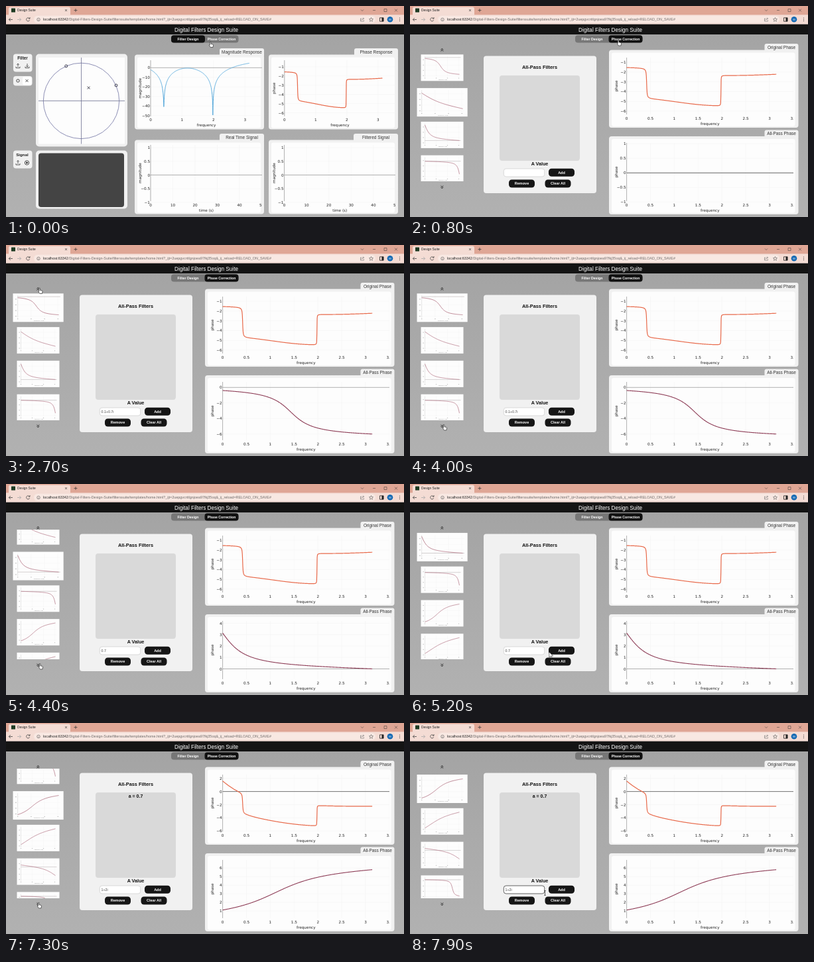
Animation of 600 by 319 pixels, one loop 8 s. Source, as an HTML page:

```html
<!DOCTYPE html>
<html lang="en">
<head>
<meta charset="utf-8">
<title>Design Suite</title>
<style>
  html, body { margin: 0; width: 100%; height: 100%; overflow: hidden; background: #a6a6a6; }
  body > svg { display: block; width: 100vw; height: 100vh; font-family: "Liberation Sans", Arial, sans-serif; }
  .plot { font-family: "DejaVu Sans", Verdana, sans-serif; }
  text { white-space: pre; }
</style>
</head>
<body>
<svg id="stage" viewBox="0 0 600 319"></svg>
<script>
const { sin, cos, atan2, sqrt, PI } = Math;
const LOOP = 8000;
const INK = '#161616', CARD = '#f1f1f1', BAR = '#f4dcd4';

// ---------- drawing helpers ----------
const rect = (x, y, w, h, fill, r = 0, extra = '') =>
  `<rect x="${x}" y="${y}" width="${w}" height="${h}" rx="${r}" fill="${fill}" ${extra}/>`;
const line = (x1, y1, x2, y2, stroke, w = 0.6) =>
  `<path d="M${x1} ${y1}L${x2} ${y2}" stroke="${stroke}" stroke-width="${w}"/>`;
const stroke = (d, color = '#333', w = 0.8, extra = '') =>
  `<path d="${d}" fill="none" stroke="${color}" stroke-width="${w}" ${extra}/>`;
const circle = (x, y, r, fill, extra = '') =>
  `<circle cx="${x}" cy="${y}" r="${r}" fill="${fill}" ${extra}/>`;
const ring = (x, y, r, color = '#222', w = 0.8) => circle(x, y, r, 'none', `stroke="${color}" stroke-width="${w}"`);
const text = (s, x, y, size, { fill = '#222', anchor = 'middle', bold = false, extra = '' } = {}) =>
  `<text x="${x}" y="${(y + size * 0.36).toFixed(2)}" font-size="${size}" fill="${fill}" text-anchor="${anchor}"` +
  `${bold ? ' font-weight="700"' : ''} ${extra}>${s}</text>`;
const group = (id, body) => `<g id="${id}">${body}</g>`;
const clip = (x, y, w, h, body, cls = '') =>
  `<svg class="${cls}" x="${x}" y="${y}" width="${w}" height="${h}" viewBox="${x} ${y} ${w} ${h}">${body}</svg>`;
const span = (from, to, step) =>
  Array.from({ length: Math.round((to - from) / step) + 1 }, (_, i) => +(from + i * step).toFixed(2));

function curve(f, px, py, color, width, n = 600) {
  const pts = span(0, n, 1).map(i => {
    const w = i / n * PI;
    return px(w).toFixed(2) + ' ' + py(f(w)).toFixed(2);
  });
  return stroke('M' + pts.join('L'), color, width, 'stroke-linejoin="round"');
}

// ---------- signal maths ----------
const bend = (r, th, w) => atan2(r * sin(w - th), 1 - r * cos(w - th));
const dist = (r, th, w) => sqrt(1 + r * r - 2 * r * cos(w - th));
const magnitude = w => 20 * Math.log10(dist(0.9954, 0.42, w) * dist(0.9982, 1.98, w) / dist(0.398, 1.074, w));
const phase = w => 0.42 - PI - bend(0.993, 0.42, w) + bend(0.998, 1.98, w) - bend(0.398, 1.074, w);

function allPass(r, th, start) {
  const s = r < 1 ? 1 : -1, b = r < 1 ? r : 1 / r;
  const g = w => s * (-w - 2 * bend(b, th, w));
  return w => start + g(w) - g(0);
}

// ---------- plots ----------
// box: left, top, right, bottom of the axes; x and y: [pixel of zero, pixels per unit]
function plot({ box: [l, t, r, b], x, y, xs, ys, xName, yName, f, color, width = 1, zero = '#a8a8a8' }) {
  const px = v => x[0] + v * x[1], py = v => y[0] - v * y[1];
  const label = v => String(v).replace('-', '−');
  let out = '';
  for (const v of xs) out += line(px(v), t, px(v), b, '#f4f4f4') + text(label(v), px(v), b + 5.6, 5.7);
  for (const v of ys) {
    out += line(l, py(v), r, py(v), v ? '#f4f4f4' : zero, v ? 0.6 : 0.9);
    out += text(label(v), l - 1, py(v), 5.7, { anchor: 'end' });
  }
  out += line(l, t, l, b, '#a0a0a0', 0.8);
  if (f) out += curve(f, px, py, color, width);
  const my = (t + b) / 2;
  out += text(xName, (l + r) / 2, b + 13.8, 5.7);
  out += text(yName, l - 16, my, 5.7, { extra: `transform="rotate(-90 ${l - 16} ${my})"` });
  return clip(l - 21, t - 4, r - l + 21, b - t + 23, out, 'plot');
}

function card(x, y, w, h, title, tabW) {
  return rect(x, y, w, h, CARD, 4) + rect(x + w - tabW, y - 9.5, tabW, 14, CARD, 3) +
    rect(x + 4, y + 4, w - 9, h - 6, '#fdfdfd', 3) +
    text(title, x + w - tabW / 2, y - 4, 6.45, { fill: '#333' });
}

// ---------- browser window ----------
function browser() {
  const url = text('localhost:63342<tspan fill="#6f6a69">/Digital-Filters-Design-Suite/filterssuite/templates/home.html?' +
    '_ijt=2uepgvcrttlgnjoea97fkj35oq&amp;_ij_reload=RELOAD_ON_SAVE#</tspan>', 56, 20.5, 5.42, { anchor: 'start' });
  return rect(0, 0, 600, 14, '#dfa695') + rect(4, 1.5, 93, 14, BAR, 3) +
    rect(8, 3.5, 6, 6, '#1d3a22', 0.5) + text('Design Suite', 17, 6.6, 4.9, { anchor: 'start' }) +
    stroke('M89 5l3 3m0 -3l-3 3M102.5 6.5h5m-2.5 -2.5v5', '#333', 0.7) +
    stroke('M535 5.5l2 2l2 -2M553 6.5h4M570 4.5h4v4h-4zM586 4.5l4 4m0 -4l-4 4', '#333', 0.5) +
    rect(0, 13.3, 600, 14.4, BAR) + rect(42, 14.8, 515, 11, '#f8e8e2', 5.5) +
    stroke('M10 20.5h-5.5m2.3 -2.5l-2.5 2.5l2.5 2.5', '#444', 0.8) +
    stroke('M17 20.5h5.5m-2.3 -2.5l2.5 2.5l-2.5 2.5', '#aaa', 0.8) +
    stroke('M35.5 19a2.6 2.6 0 1 0 .2 2.3M36 17v2.2h-2.2', '#444', 0.8) +
    ring(49, 20.5, 2.3, '#555', 0.6) + line(49, 20, 49, 21.8, '#555') + url +
    stroke('M536 19h-1.5v4h5v-1.5M536 21.5q.5 -2.5 3.5 -2.5m-1.4 -1.5l1.5 1.5l-1.5 1.5', '#666', 0.6) +
    stroke('M550.5 17.5l.9 2l2.1 .2l-1.6 1.5l.5 2.1l-1.9 -1.1l-1.9 1.1l.5 -2.1l-1.6 -1.5l2.1 -.2z', '#555', 0.6) +
    stroke('M563.5 17.8h5.5v5.4h-5.5z', '#222', 0.8) + rect(566.5, 17.8, 2.7, 5.4, '#222') +
    circle(579, 20.3, 4.3, '#1469b3') + text('M', 579, 20.3, 4.2, { fill: '#fff' }) +
    [18, 20.3, 22.6].map(y => circle(593.5, y, 0.6, '#444')).join('') +
    rect(0, 27.7, 600, 15.3, '#141414') +
    text('Digital Filters Design Suite', 302, 35.7, 8.2, { fill: '#fff' });
}

const toggle = x => rect(249, 44.2, 101.5, 11.3, '#777', 4) + rect(x, 44.2, 51, 11.3, '#111', 4) +
  text('Filter Design', 274.5, 49.8, 5.25, { fill: '#fff', bold: true }) +
  text('Phase Correction', 325, 49.8, 5.15, { fill: '#fff', bold: true });

// ---------- first page ----------
const tray = (x, y, down) => stroke(`M${x - 3} ${y + 1}v2h6v-2M${x} ${y + 1.5}v-5` +
  (down ? 'm-1.7 3.3l1.7 1.7l1.7 -1.7' : 'm-1.7 1.7l1.7 -1.7l1.7 1.7'), '#222', 0.7);

function designPage() {
  const tools =
    rect(11, 72.5, 28.5, 27, CARD, 4) + text('Filter', 25, 79, 6.4, { bold: true }) + tray(18, 90.6) + tray(32, 90.6, true) +
    rect(11, 106, 28.5, 14.5, CARD, 4) + rect(25, 107, 13.5, 12.5, '#fff', 3) +
    ring(18, 113, 2.2) + stroke('M29.5 111l4 4m0 -4l-4 4', '#222') +
    rect(11, 218.5, 28.5, 27, CARD, 4) + text('Signal', 24.5, 225, 6.2, { bold: true }) + tray(18, 237.1) +
    ring(31.5, 237, 3.2) + '<path d="M30.5 235.2v3.6l3 -1.8z"/>';
  const plane = rect(45, 72.5, 138, 140, CARD, 5) + rect(49, 78, 130, 130.5, '#fdfdfd') +
    ring(113.5, 143.4, 57.2, '#7f82ac', 0.9) +
    line(113.5, 78, 113.5, 208.5, '#6d7090', 0.8) + line(49, 143.4, 179, 143.4, '#6d7090', 0.8) +
    ring(90.7, 90.8, 2, '#334', 0.9) + ring(166, 120, 2, '#334', 0.9) +
    stroke('M122.7 121.7l3.8 3.8m0 -3.8l-3.8 3.8', '#223', 0.9);
  const pad = rect(45, 218.5, 138, 88, CARD, 5) + rect(49, 222.5, 129, 81.5, '#444', 4);
  const freq = { xs: [0, 1, 2, 3], xName: 'frequency' };
  const signal = { xs: span(0, 50, 10), ys: span(-1, 1, 0.5), y: [255.5, 41.3], xName: 'time (s)', yName: 'magnitude' };
  return toggle(249) + tools + plane + pad +
    card(194, 73.5, 195, 113, 'Magnitude Response', 67) +
    plot({ ...freq, box: [218, 82, 386, 166.6], x: [218, 47.4], y: [93.3, 1.45], ys: span(-50, 0, 10),
           yName: 'magnitude', f: magnitude, color: '#5aaadb' }) +
    card(396, 73.5, 195, 113, 'Phase Response', 66) +
    plot({ ...freq, box: [419.8, 82, 587, 166.6], x: [419.8, 47], y: [78.1, 13.9], ys: span(-6, -1, 1),
           yName: 'phase', f: phase, color: '#e8694a', width: 1.2 }) +
    card(194, 202.5, 195, 112, 'Real Time Signal', 67) +
    plot({ ...signal, box: [218, 210, 386, 295], x: [218, 3.35] }) +
    card(396, 202.5, 195, 112, 'Filtered Signal', 67) +
    plot({ ...signal, box: [419.5, 210, 587, 295], x: [419.5, 3.36] });
}

// ---------- second page ----------
// pole radius and angle, first value, label, then thumbnail heights: start, end, zero line
const filters = [
  { r: 0.7071, th: 1.4289, v: -0.4, name: '0.1+0.7i', ys: 6, ye: 30, z: 4.5 },
  { r: 0.25, th: 0, v: PI, name: '0.3', ys: 7, ye: 29 },
  { r: 0.7, th: 0, v: PI, name: '0.7', ys: 5, ye: 28.5, z: 28.5 },
  { r: 0.85, th: PI, v: 0, name: '-0.9', ys: 9, ye: 28.5, z: 9 },
  { r: 2.236, th: 1.1071, v: 1.1, name: '1+2i', ys: 33, ye: 6 },
  { r: 4, th: 0.5, v: 1, name: '4+2i', ys: 30, ye: 6 },
  { r: 0.4, th: PI, v: 0.5, name: '-0.4', ys: 10, ye: 26, z: 13 },
  { r: 0.88, th: 2.5, v: 0, name: '-0.7+0.5i', ys: 6.5, ye: 31, z: 6.5 }
].map(p => ({ ...p, f: allPass(p.r, p.th, p.v) }));

function thumb({ f, ys, ye, z }, i) {
  const a = f(0), b = f(PI);
  let out = rect(0, 0, 64, 40, '#fdfdfd');
  for (const x of [6, 23, 40, 57]) out += line(x, 3, x, 34, '#f3f3f3', 0.4) + rect(x - 0.6, 35.2, 1.2, 1, '#bbb');
  for (const y of [8, 16, 24, 32]) out += line(6, y, 60, y, '#f3f3f3', 0.4) + rect(3, y - 0.5, 1.4, 1, '#bbb');
  out += line(6, 3, 6, 34, '#ccc', 0.4);
  if (z) out += line(6, z, 60, z, '#b0a8aa', 0.5);
  out += curve(f, w => 6 + w / PI * 52, v => ys + (v - a) / (b - a) * (ye - ys), '#ab6476', 0.65, 60);
  out += text('frequency (rad)', 33, 37.8, 2, { fill: '#999' });
  return group('thumb' + i, out);
}

const chevrons = (y, d) => [y, y + 2.2].map(v => stroke(`M46.5 ${v}l1.8 ${-d}l1.8 ${d}`, '#111', 0.9)).join('');
const button = (s, x, y) => rect(x, y, 39, 12, INK, 4.5) + text(s, x + 19.5, y + 6, 5.5, { fill: '#fff', bold: true });

function phasePage() {
  const axis = { xs: span(0, 3.5, 0.5), x: [326.6, 71.8], xName: 'frequency', yName: 'phase' };
  const upper = { ...axis, box: [326.6, 78, 578, 164], color: '#e8694a', width: 1.2 };
  const lower = { ...axis, box: [326.6, 207, 578, 295], color: '#8d3c56', width: 1.1 };
  const scales = [
    { y: [215.3, 11.75], ys: [-6, -4, -2, 0] },
    { y: [279.5, 17.25], ys: span(0, 4, 1) },
    { y: [279.5, 17.25], ys: span(0, 4, 1) },
    { y: [215, 22.7], ys: span(-3, 0, 1) },
    { y: [297, 12.95], ys: span(1, 6, 1) }
  ];
  const added = w => phase(w) + filters[2].f(w);
  return toggle(299.5) + chevrons(66.2, 1.8) + chevrons(271.8, -1.8) +
    clip(8, 69, 82, 196, filters.map(thumb).join('')) +
    rect(111, 75.5, 170, 207.5, CARD, 4) + rect(135, 105, 121, 129, '#d9d9d9', 4) +
    text('All-Pass Filters', 195.5, 92, 7.35, { bold: true, fill: '#111' }) +
    text('A Value', 195.5, 238.5, 7.2, { bold: true, fill: '#111' }) +
    group('added', text('a = 0.7', 195.5, 110.3, 7, { bold: true, fill: '#111' })) +
    rect(141.3, 246, 61.5, 12, '#fff', 3.5, 'id="field" stroke="#ccc" stroke-width=".7"') +
    text('', 143.5, 252, 5.3, { anchor: 'start', fill: '#444', extra: 'id="value"' }) +
    button('Add', 209, 245.8) + button('Remove', 149, 262.5) + button('Clear All', 203.5, 262.5) +
    card(300, 66.5, 285.5, 117.5, 'Original Phase', 51) +
    group('before', plot({ ...upper, y: [70.2, 14.8], ys: span(-6, -1, 1), f: phase })) +
    group('after', plot({ ...upper, y: [103.6, 9.95], ys: [-6, -4, -2, 0, 2], f: added, zero: '#666' })) +
    card(300, 197, 285.5, 118, 'All-Pass Phase', 51) +
    group('phase-1', plot({ ...lower, y: [252.3, 44], ys: span(-1, 1, 0.5), zero: '#555' })) +
    scales.map((s, i) => group('phase' + i, plot({ ...lower, ...s, f: filters[i].f }))).join('');
}

const pointers = {
  arrow: '<path d="M0 0v8l1.9 -1.7l1.3 2.9l1.2 -.5l-1.3 -2.8h2.7z" fill="#fff" stroke="#111" stroke-width=".5"/>',
  hand: '<path d="M0 0q.9 0 .9 1v2.3l2.8 .7q.9 .3 .8 1.2l-.6 3.3h-3.5l-2.1 -3l.5 -.7l.5 .4V1q0 -1 .7 -1z" fill="#fff" stroke="#111" stroke-width=".6"/>',
  beam: stroke('M-1.2 -3.5h2.4M0 -3.5v7M-1.2 3.5h2.4', '#222', 0.7)
};

document.getElementById('stage').innerHTML =
  '<defs><linearGradient id="back" x2="0" y2="1"><stop stop-color="#a2a2a2"/><stop offset="1" stop-color="#b1b1b1"/></linearGradient></defs>' +
  rect(0, 0, 600, 319, 'url(#back)') + browser() + group('design', designPage()) + group('correct', phasePage()) +
  group('cursor', Object.entries(pointers).map(([k, v]) => group(k, v)).join(''));

// ---------- timeline ----------
const pages = [[0, 'design'], [400, 'correct']];
const active = [[0, 1], [2500, 0], [4070, 1], [4250, 2], [6900, 3], [7250, 4]];
const shape = [[0, 'hand'], [1050, 'arrow'], [2350, 'hand'], [2950, 'arrow'], [3400, 'hand'], [4700, 'arrow'],
  [5250, 'hand'], [5800, 'arrow'], [6100, 'hand'], [7450, 'arrow'], [7700, 'beam']];
const path = [[0, 308, 54], [350, 314, 51.5], [1000, 314, 51.5], [1800, 92, 100], [2400, 50.5, 65], [2800, 50.5, 65],
  [3500, 51, 271.5], [4600, 51, 271.5], [5350, 228, 252], [5700, 228, 252], [6150, 45, 271], [6400, 49, 271.5],
  [7400, 49, 271.5], [7800, 203.5, 257], [LOOP, 203.5, 257]];
const scroll = [[0, 0], [4070, 0], [4580, 101], [6900, 101], [7500, 198.5], [LOOP, 198.5]];

const at = (keys, t) => keys.filter(k => k[0] <= t).pop()[1];
function ease(keys, t, col = 1) {
  const i = Math.max(1, keys.findIndex(k => k[0] > t)), a = keys[i - 1], b = keys[i];
  const u = (t - a[0]) / (b[0] - a[0]);
  return a[col] + (b[col] - a[col]) * u * u * (3 - 2 * u);
}
const el = id => document.getElementById(id);
const show = (id, on) => { el(id).style.display = on ? '' : 'none'; };

function render(t) {
  const on = at(active, t), picked = t >= 2500 ? on : -1, page = at(pages, t);
  for (const [, id] of pages) show(id, id === page);
  for (let i = -1; i < 5; i++) show('phase' + i, i === picked);
  show('added', t >= 5600);
  show('after', t >= 5600);
  show('before', t < 5600);
  el('value').textContent = picked < 0 ? '' : filters[picked].name;
  el('field').setAttribute('stroke', t >= 7800 ? '#222' : '#ccc');

  const offset = ease(scroll, t);
  filters.forEach((_, i) => {
    const y = 73.3 + 50.8 * i - offset;
    el('thumb' + i).setAttribute('transform', i === on
      ? `translate(10.5 ${y}) scale(1.19 1.075)` : `translate(16.5 ${y})`);
  });

  el('cursor').setAttribute('transform', `translate(${ease(path, t, 1)} ${ease(path, t, 2)})`);
  for (const k in pointers) show(k, k === at(shape, t));
}

const start = performance.now();
function tick() {
  render((performance.now() - start) % LOOP);
  requestAnimationFrame(tick);
}
tick();
</script>
</body>
</html>
```
